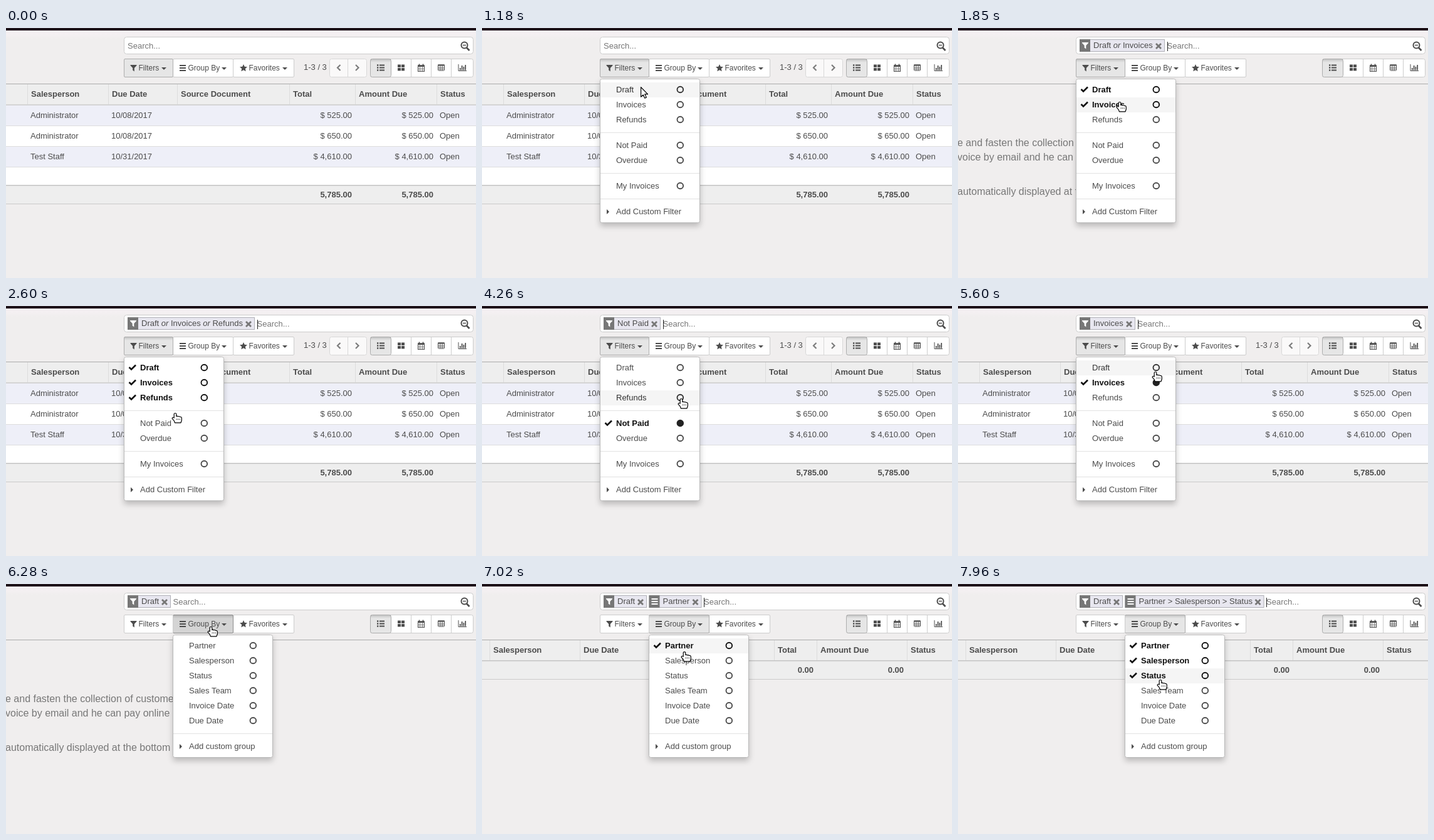
Write an HTML page that moves like this. It is 750 px wide and 400 px high and loops after 8 s.

```html
<!DOCTYPE html>
<html lang="en">
<head>
<meta charset="utf-8">
<title>Invoice filters</title>
<style>
  html, body { margin: 0; width: 100%; height: 100%; overflow: hidden; background: #f0eeee; }
  svg { display: block; font: 13px "Liberation Sans", Arial, sans-serif; }
  .menu { filter: drop-shadow(0 5px 5px rgba(0, 0, 0, .22)); }
</style>
</head>
<body>
<svg width="750" height="400" viewBox="0 0 750 400">
  <defs>
    <linearGradient id="glow" x2="0" y2="1">
      <stop stop-color="#f7f1f5"/><stop offset="1" stop-color="#f0eeee"/>
    </linearGradient>
    <linearGradient id="inset" x2="0" y2="1">
      <stop stop-opacity=".15"/><stop offset="1" stop-opacity="0"/>
    </linearGradient>
  </defs>
  <g id="scene"></g>
</svg>
<script>
const LOOP = 8000;
const INK = '#4c4c4c', DARK = '#222';
const scene = document.getElementById('scene');
const pen = document.createElement('canvas').getContext('2d');

// Changes of interface state: time, then the properties that change.
const EVENTS = [
  [0, { table: 'list', menu: '', pressed: false, facets: [], solo: '' }],
  [260, { pressed: true }],
  [360, { pressed: false, menu: 'Filters' }],
  [1280, { facets: [['Draft']] }],
  [1400, { table: 'empty' }],
  [1760, { facets: [['Draft', 'Invoices']] }],
  [1920, { table: 'list' }],
  [2300, { facets: [['Draft', 'Invoices', 'Refunds']] }],
  [3030, { facets: [['Draft', 'Invoices', 'Refunds'], ['Not Paid']] }],
  [3800, { facets: [['Not Paid']], solo: 'Not Paid' }],
  [4500, { facets: [['Refunds']], solo: 'Refunds' }],
  [4560, { table: 'empty' }],
  [5120, { facets: [['Invoices']], solo: 'Invoices' }],
  [5200, { table: 'list' }],
  [5780, { facets: [['Draft']], solo: 'Draft' }],
  [5880, { table: 'empty' }],
  [6280, { menu: 'Group By' }],
  [6780, { facets: [['Draft'], ['Partner']] }],
  [6880, { table: 'grouped' }],
  [7260, { facets: [['Draft'], ['Partner', 'Salesperson']] }],
  [7840, { facets: [['Draft'], ['Partner', 'Salesperson', 'Status']] }],
];

// Pointer path: time, x, y of the tip.
const POINTER = [
  [0, 228, 64], [360, 228, 64], [361, 253, 84], [809, 253, 84], [810, 253, 94],
  [1300, 253, 94], [1620, 258, 118], [1860, 258, 118], [2120, 263, 143], [2380, 263, 143],
  [2600, 270, 171], [2860, 275, 191], [3050, 275, 191], [3490, 316, 187], [3900, 316, 187],
  [4260, 318, 148], [4820, 318, 148], [5040, 316, 120], [5430, 316, 120], [5600, 315, 105],
  [5660, 315, 98], [5850, 315, 98], [6190, 327, 68], [6290, 327, 68], [6600, 322, 95],
  [6860, 322, 95], [7180, 324, 121], [7550, 324, 121], [7800, 323, 153], [8000, 323, 153],
];
const POINTER_SHOWN = 1050, HAND_SHOWN = 1240;

const MENUS = {
  'Filters': { x: 188, bottom: 311, dividers: [167, 232, 273], custom: ['Add Custom Filter', 293],
    items: [['Draft', 98], ['Invoices', 122], ['Refunds', 146], ['Not Paid', 187], ['Overdue', 211], ['My Invoices', 252]] },
  'Group By': { x: 266, bottom: 277, dividers: [239], custom: ['Add custom group', 259],
    items: ['Partner', 'Salesperson', 'Status', 'Sales Team', 'Invoice Date', 'Due Date'].map((name, i) => [name, 98 + 24 * i]) },
};
const GROUPS = MENUS['Group By'].items.map(item => item[0]);

const rect = (x, y, w, h, fill, extra = '') =>
  `<rect x="${x}" y="${y}" width="${w}" height="${h}" fill="${fill}" ${extra}/>`;
const box = (x, y, w, h, fill, stroke, r = 3) =>
  rect(x + .5, y + .5, w - 1, h - 1, fill, `stroke="${stroke}" rx="${r}"`);
const path = (d, fill, extra = '') => `<path d="${d}" fill="${fill}" ${extra}/>`;
const stroke = (d, color, width) => path(d, 'none', `stroke="${color}" stroke-width="${width}"`);
const text = (x, y, s, fill = INK, extra = '') => `<text x="${x}" y="${y}" fill="${fill}" ${extra}>${s}</text>`;
const BOLD = 'font-weight="bold"', RIGHT = 'text-anchor="end"';
const at = (x, y, content) => `<g transform="translate(${x} ${y})">${content}</g>`;

function widthOf(s, style = '') {
  pen.font = `${style} 13px "Liberation Sans", Arial, sans-serif`;
  return pen.measureText(s).width;
}

const funnel = (x, y, color) => at(x, y, path('M0 0H10V1L6.3 5V10.5L3.7 8.5V5L0 1Z', color));
const bars = (x, y, color) => at(x, y, path('M0 0H10V2H0ZM0 4H10V6H0ZM0 8H10V10H0Z', color));
const star = (x, y) => at(x, y, path('M6 0L7.7 3.8 12 4.3 8.8 7.1 9.7 11.3 6 9.2 2.3 11.3 3.2 7.1 0 4.3 4.3 3.8Z', INK));
const caretDown = x => path(`M${x} 63h8l-4 4z`, INK);

function viewIcons() {
  const list = [59, 63, 67].map(y => rect(592, y - .7, 2.4, 2.4, INK) + rect(596, y - .5, 8, 2, INK)).join('');
  const blocks = [625, 631].map(x => rect(x, 58.5, 5, 4.4, INK) + rect(x, 64, 5, 4.4, INK)).join('');
  const calendar = rect(657.5, 60, 10, 9.5, 'none', `stroke="${INK}"`) + rect(657, 59.5, 11, 2.5, INK) +
    stroke('M659.5 57.5V61M665.5 57.5V61', INK, 1.6) +
    stroke('M660.5 62V69.5M664.5 62V69.5M657 64.5H668M657 67H668', INK, .6);
  const table = rect(689.5, 59, 10, 9, 'none', `stroke="${INK}" rx="1"`) + rect(689, 58.5, 11, 2, INK) +
    stroke('M692.8 60V68M696.2 60V68M689 63.2H700M689 65.7H700', INK, .8);
  const chart = stroke('M722 58V68.5H735', INK, 1) +
    stroke('M724.8 64V67.5M727.6 60V67.5M730.4 62V67.5M733.2 59V67.5', INK, 1.7);
  return list + blocks + calendar + table + chart;
}

function toolbarButton(label, x, w, textX, caretX, icon, state, p) {
  const open = state.menu === label;
  const hover = p.y >= 49 && p.y < 79 && p.x >= x && p.x < x + w;
  const pressed = open || (state.pressed && hover);
  const fill = pressed && hover ? '#d4d4d4' : pressed || hover ? '#e6e6e6' : '#fff';
  const edge = pressed && hover ? '#8c8c8c' : pressed || hover ? '#adadad' : '#ccc';
  return box(x, 49, w, 30, fill, edge, 1.5) +
    (pressed ? rect(x + 1, 50, w - 2, 5, 'url(#inset)') : '') +
    icon + text(textX, 68, label, INK, 'font-size="12"') + caretDown(caretX);
}

function toolbar(state, p) {
  const buttons = [
    ['Favorites', 362, 98, 387.5, 441, star(373, 58)],
    ['Group By', 266, 97, 290.5, 344, bars(277, 59, INK)],
    ['Filters', 188, 79, 211.5, 248, funnel(198.5, 59, INK)],
  ].map(b => toolbarButton(...b, state, p)).join('');
  const pager = state.table !== 'list' ? '' :
    text(475, 67, '1-3 / 3') + box(516, 49, 60, 30, '#faf9f9', '#d8d8d8') + rect(545, 50, 1, 28, '#d8d8d8') +
    stroke('M533.5 59L529 63.5 533.5 68M558 59L562.5 63.5 558 68', '#7d7d7d', 2.2);
  const views = box(581, 49, 165, 30, '#fff', '#ccc') +
    [646, 678, 710].map(x => rect(x, 50, 1, 28, '#ccc')).join('') +
    box(581, 49, 34, 30, '#e6e6e6', '#adadad') + rect(582, 50, 32, 5, 'url(#inset)') + viewIcons();
  return buttons + pager + views;
}

function facet(x, names) {
  const grouped = GROUPS.includes(names[0]);
  const separator = grouped ? '&gt;' : '<tspan font-style="italic">or</tspan>';
  const gap = widthOf(' ') * 2 + (grouped ? widthOf('>') : widthOf('or', 'italic'));
  const textWidth = names.reduce((sum, name) => sum + widthOf(name), 0) + gap * (names.length - 1);
  const width = Math.round(textWidth + 41), closeX = x + width - 15;
  return { width, svg:
    box(x, 18, width, 20, '#e8e7f0', '#afafb6', 0) + rect(x, 18, 17, 20, '#777') +
    (grouped ? bars(x + 4, 23, '#fff') : funnel(x + 4, 23, '#fff')) +
    text(x + 22, 32, names.join(` ${separator} `)) +
    stroke(`M${closeX + 1} 25l8 8m0-8l-8 8`, '#777', 2.8) };
}

function searchBar(state, t) {
  let x = 194, svg = box(188, 14, 558, 28, '#fff', '#ccc', 4);
  for (const names of state.facets) {
    const f = facet(x, names);
    svg += f.svg;
    x += f.width + 3.5;
  }
  svg += text(x, 33, 'Search...', '#777');
  if (state.facets.length && (t - state.facetTime) % 1000 < 500 && !(state.menu === 'Group By' && state.facetTime < 6280))
    svg += rect(Math.round(x), 22, 1, 15, '#222');
  return svg + `<circle cx="731.5" cy="27.5" r="5" fill="none" stroke="${INK}" stroke-width="2"/>` +
    stroke('M735 31.5L739.5 36', INK, 2.6) + stroke('M729 27.5H734', INK, 1.4);
}

function header(columns) {
  return rect(0, 90, 750, 33, '#eee') + rect(0, 122, 750, 2, '#d4d4d4') +
    columns.map(([x, label]) => rect(x, 90, 1, 32, '#dcdcdc') + text(x + 6, 110, label, INK, BOLD)).join('');
}

function footer(y, h, cells) {
  return rect(0, y, 750, h, '#eee') + rect(0, y - 1, 750, 1.5, '#c4c4c4') + rect(0, y + h, 750, 1, '#cacaca') +
    cells.map(([x, value]) => text(x, y + 19, value, INK, `${BOLD} ${RIGHT}`)).join('');
}

const TABLES = {
  list() {
    const rows = [
      ['Administrator', '10/08/2017', '$ 525.00'],
      ['Administrator', '10/08/2017', '$ 650.00'],
      ['Test Staff', '10/31/2017', '$ 4,610.00'],
    ].map(([person, date, amount], i) => {
      const y = 124 + 33 * i, base = y + 20;
      return rect(0, y, 750, 32, i % 2 ? '#fff' : '#eeeff8') + rect(0, y + 32, 750, 1, '#ddd') +
        text(39, base, person) + text(168, base, date) + text(552, base, amount, INK, RIGHT) +
        text(682, base, amount, INK, RIGHT) + text(692, base, 'Open');
    }).join('');
    return rect(0, 223, 750, 29, '#fff') +
      header([[34, 'Salesperson'], [163, 'Due Date'], [273, 'Source Document'], [452, 'Total'], [557, 'Amount Due'], [687, 'Status']]) +
      rows + footer(252, 29, [[552, '5,785.00'], [682, '5,785.00']]);
  },
  empty() {
    return [[189, 'e and fasten the collection of customer'], [212, 'voice by email and he can pay online'],
      [267, 'automatically displayed at the bottom of']]
      .map(([y, line]) => text(-1, y, line, '#777', 'font-size="16"')).join('');
  },
  grouped() {
    return header([[12, 'Salesperson'], [156, 'Due Date'], [466, 'Total'], [534, 'Amount Due'], [678, 'Status']]) +
      footer(123, 29, [[529, '0.00'], [673, '0.00']]);
  },
};

function menu(state, p) {
  const m = MENUS[state.menu];
  if (!m) return '';
  const chosen = state.facets.flat();
  const items = m.items.map(([name, y]) => {
    const on = chosen.includes(name);
    const hover = p.x > m.x && p.x < m.x + 160 && p.y >= y - 11 && p.y < y + 13;
    const color = on ? '#111' : hover ? '#333' : INK;
    const filled = on && state.solo === name && m.x === 188;
    return (hover ? rect(m.x + 1, y - 11, 158, 24, '#f5f5f5') : '') +
      (on ? stroke(`M${m.x + 8.5} ${y}l3.5 3.5 7-7`, '#111', 2.6) : '') +
      text(m.x + 26, y + 5, name, color, on ? BOLD : '') +
      `<circle cx="${m.x + 128.3}" cy="${y + .5}" r="4.8" fill="${filled ? DARK : 'none'}" stroke="${filled ? DARK : color}" stroke-width="1.9"/>`;
  }).join('');
  const [label, y] = m.custom;
  return `<g class="menu">${box(m.x, 81, 160, m.bottom - 80, '#fff', '#b8b8b8', 3)}</g>` + items +
    m.dividers.map(d => rect(m.x + 1, d, 158, 1, '#e2e2e2')).join('') +
    path(`M${m.x + 11} ${y - 3}l4 4-4 4z`, INK) + text(m.x + 26, y + 5, label);
}

function pointer(p, t) {
  if (t < POINTER_SHOWN) return '';
  const outline = 'stroke="#000" stroke-width="1.2" stroke-linejoin="round"';
  const shape = t < HAND_SHOWN
    ? path('M.6 .6V16.2L4.2 13 6.8 18.3 9.3 17.1 6.8 11.9H11.5Z', '#fff', outline)
    : path('M-1.8 8V1.8Q-1.8 .5 0 .5T1.8 1.8V5.4Q3.4 4.6 4.6 5.8 6.2 5 7.4 6.3 10.3 6 10.3 8.4V12L9 15.8H-.6L-1.8 12.6-4.8 9.2Q-5 7 -2.8 7.4Z', '#fff', outline) +
      stroke('M2.2 9.6V11M4.7 9.6V11M7.2 9.6V11', '#000', 1);
  return at(p.x.toFixed(1), p.y.toFixed(1), shape);
}

function pointerAt(t) {
  const i = POINTER.findIndex(key => key[0] > t);
  const [t0, x0, y0] = POINTER[i - 1], [t1, x1, y1] = POINTER[i];
  const u = (t - t0) / (t1 - t0), e = u * u * (3 - 2 * u);
  return { x: x0 + (x1 - x0) * e, y: y0 + (y1 - y0) * e };
}

function stateAt(t) {
  const state = {};
  for (const [time, change] of EVENTS) {
    if (time > t) break;
    Object.assign(state, change);
    if (change.facets) state.facetTime = time;
  }
  return state;
}

function draw(t) {
  const state = stateAt(t), p = pointerAt(t);
  return rect(0, 0, 750, 400, '#f0eeee') + rect(0, 4, 750, 14, 'url(#glow)') + rect(0, 0, 750, 4, '#1d1219') +
    rect(0, 89, 750, 1, '#ababab') + TABLES[state.table]() + searchBar(state, t) + toolbar(state, p) +
    menu(state, p) + pointer(p, t);
}

let shown = '';
function frame() {
  const svg = draw(performance.now() % LOOP);
  if (svg !== shown) scene.innerHTML = shown = svg;
  requestAnimationFrame(frame);
}
frame();
</script>
</body>
</html>
```
